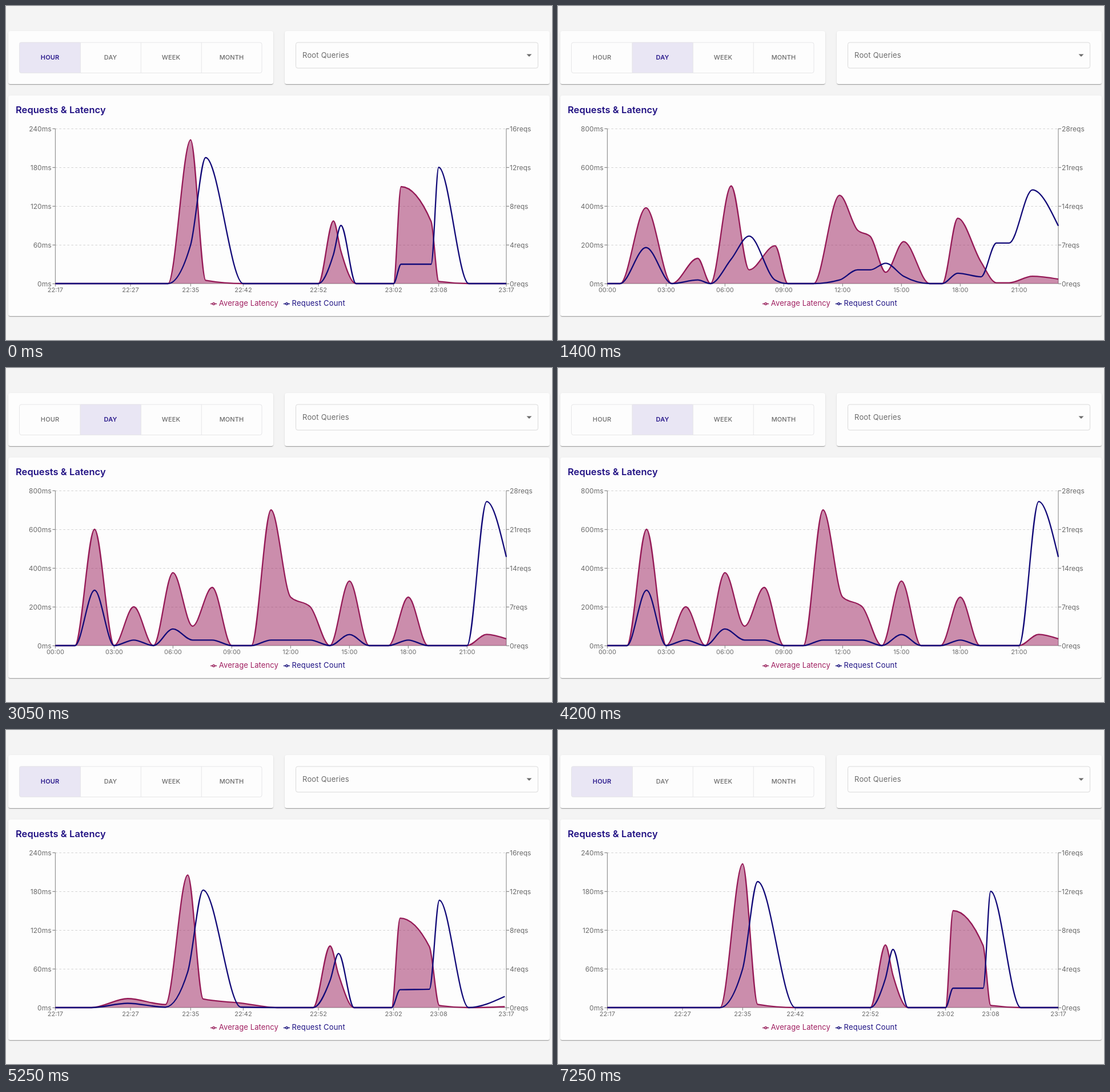
Recreate the animation shown at these times as an HTML page. Size 956x586 px, loop 7300 ms.

```html
<!DOCTYPE html>
<html lang="en">
<head>
<meta charset="utf-8">
<title>Requests &amp; Latency</title>
<style>
  html, body { margin: 0; width: 100%; height: 100%; overflow: hidden; background: #f4f4f4; }
  body { position: relative; font-family: Inter, "Open Sans", sans-serif; color: #6b6b6b; }
  .card {
    position: absolute; box-sizing: border-box; background: #fdfdfd; border-radius: 3.5px;
    box-shadow: 0 2px 1px -1px rgba(0,0,0,.2), 0 1px 1px rgba(0,0,0,.14), 0 1px 3px rgba(0,0,0,.1);
  }
  svg { position: absolute; left: 0; top: 0; }
  text { fill: #6b6b6b; }
  .btn { font-size: 11px; font-weight: 500; text-anchor: middle; letter-spacing: .1px; }
  .btn.on { font-weight: 600; fill: #2a1a8c; }
  .select { font-size: 13px; letter-spacing: .2px; }
  .title { font-size: 16.4px; font-weight: 600; fill: #1f0f82; letter-spacing: .1px; }
  .ylab { font-size: 12px; }
  .xlab { font-size: 11px; text-anchor: middle; }
  .key { font-size: 13px; }
  .end { text-anchor: end; }
  .frame { fill: none; stroke: #e6e6e8; }
  .axis { fill: none; stroke: #8c8c8c; stroke-width: 1.1; }
  .grid { fill: none; stroke: #d2d2d2; stroke-dasharray: 3.5 3.5; }
  .line { fill: none; stroke-width: 2.3; stroke-linejoin: round; }
  .pink { stroke: #951a57; }
  .blue { stroke: #120a78; }
</style>
</head>
<body>
<div class="card" style="left:4px;top:44px;width:464px;height:93px"></div>
<div class="card" style="left:488px;top:44px;width:464px;height:93px"></div>
<div class="card" style="left:4px;top:157px;width:948px;height:387px"></div>

<svg width="956" height="586" viewBox="0 0 956 586">
  <g id="buttons"></g>
  <rect x="507.5" y="64" width="424" height="45" rx="3.5" fill="none" stroke="#dadada"/>
  <text class="select" x="519" y="91">Root Queries</text>
  <path d="M911.5 84.5h9l-4.5 4.6z" fill="#6b6b6b"/>

  <text class="title" x="17" y="188">Requests &amp; Latency</text>
  <path class="grid" id="grid"/>
  <path class="axis" id="axis"/>
  <g id="labels"></g>
  <path id="fill" fill="#991f5d" fill-opacity=".5"/>
  <path id="latency" class="line pink"/>
  <path id="count" class="line blue"/>

  <g id="legend"></g>
</svg>

<script>
const LOOP = 7300, DURATION = 1500, FADE = 250;
const LEFT = 86.4, RIGHT = 876, TOP = 215, BASE = 487, ROW = 68;
const $ = id => document.getElementById(id);

// Sparse series: position -> value, all other positions are 0.
const fillIn = (at, values) => at.map(k => values[k] || 0);
const hours = Array.from({ length: 24 }, (_, i) => i);
const minutes = [0, 5, 10, 15, 18, 20, 25, 30, 35, 37, 38, 40, 45, 46, 50, 51, 55, 60];

const views = {
  hour: {
    at: minutes, span: 60, ms: 240, reqs: 16,
    ticks: { 0: '22:17', 10: '22:27', 18: '22:35', 25: '22:42', 35: '22:52', 45: '23:02', 51: '23:08', 60: '23:17' },
    latency: { 18: 222.5, 20: 5, 37: 97, 38: 50, 46: 150, 50: 96, 51: 3.5 },
    count: { 18: 4, 20: 13, 37: 3, 38: 6, 46: 2, 50: 2, 51: 12 }
  },
  day: {
    at: hours, span: 23, ms: 800, reqs: 28,
    ticks: { 0: '00:00', 3: '03:00', 6: '06:00', 9: '09:00', 12: '12:00', 15: '15:00', 18: '18:00', 21: '21:00' },
    latency: { 2: 600, 4: 200, 6: 376, 7: 100, 8: 300, 11: 700, 12: 250, 13: 200, 15: 333, 18: 250, 22: 58, 23: 35 },
    count: { 2: 10, 4: 1, 6: 3, 7: 1, 8: 1, 11: 1, 12: 1, 13: 1, 15: 2, 18: 1, 22: 26, 23: 16 }
  }
};

const xOf = (view, k) => LEFT + k / view.span * (RIGHT - LEFT);
const toPoints = (view, values, max) =>
  fillIn(view.at, values).map((v, i) => [xOf(view, view.at[i]), BASE - v / max * (BASE - TOP)]);

for (const v of Object.values(views)) {
  v.latencyPts = toPoints(v, v.latency, v.ms);
  v.countPts = toPoints(v, v.count, v.reqs);
}

// cubic-bezier(.25, .1, .25, 1)
function ease(t) {
  if (t <= 0) return 0;
  if (t >= 1) return 1;
  let lo = 0, hi = 1;
  for (let i = 0; i < 24; i++) {
    const s = (lo + hi) / 2, r = 1 - s;
    if (.75 * r * r * s + .75 * r * s * s + s * s * s < t) lo = s; else hi = s;
  }
  const r = 1 - lo;
  return .3 * r * r * lo + 3 * r * lo * lo + lo ** 3;
}

// Each new point starts at the old point with the same relative index.
function morph(from, to, f) {
  const ratio = from.length / to.length;
  return to.map(([x, y], i) => {
    const [px, py] = from[Math.floor(i * ratio)];
    return [px + (x - px) * f, py + (y - py) * f];
  });
}

// Monotone cubic curve through the points.
function curve(points) {
  const p = points.filter((q, i) => !i || q[0] - points[i - 1][0] > 1e-6);
  const n = p.length;
  const h = i => p[i + 1][0] - p[i][0];
  const s = i => (p[i + 1][1] - p[i][1]) / h(i);
  const m = p.map((_, i) => {
    if (!i || i === n - 1) return 0;
    const a = s(i - 1), b = s(i), avg = (a * h(i) + b * h(i - 1)) / (h(i - 1) + h(i));
    return (Math.sign(a) + Math.sign(b)) * Math.min(Math.abs(a), Math.abs(b), Math.abs(avg) / 2);
  });
  m[0] = (3 * s(0) - m[1]) / 2;
  m[n - 1] = (3 * s(n - 2) - m[n - 2]) / 2;
  let d = `M${p[0]}`;
  for (let i = 0; i < n - 1; i++) {
    const t = h(i) / 3, [x0, y0] = p[i], [x1, y1] = p[i + 1];
    d += `C${[x0 + t, y0 + t * m[i], x1 - t, y1 - t * m[i + 1], x1, y1].map(v => v.toFixed(2))}`;
  }
  return d;
}

const text = (cls, x, y, str) => `<text class="${cls}" x="${x}" y="${y}">${str}</text>`;
const names = ['HOUR', 'DAY', 'WEEK', 'MONTH'];
const buttonX = i => 24 + i * 106;

$('buttons').innerHTML =
  names.map((_, i) => `<rect class="bg" x="${buttonX(i) - .5}" y="63.5" width="107" height="54" rx="2" fill="#e9e6f4" opacity="0"/>`).join('') +
  '<rect class="frame" x="23.5" y="64" width="424.5" height="53.5" rx="3.5"/>' +
  `<path class="frame" d="${[1, 2, 3].map(i => `M${buttonX(i) + .3} 64v53.5`).join('')}"/>` +
  names.map((s, i) => text('btn', buttonX(i) + 53, 94, s)).join('');
const fills = document.querySelectorAll('.bg'), captions = document.querySelectorAll('.btn');

const rows = [0, 1, 2, 3, 4];
$('grid').setAttribute('d', rows.slice(0, 4).map(i => `M${LEFT} ${TOP + i * ROW + .5}H${RIGHT}`).join(''));

const legendItem = (x, cls, color, label, spacing) =>
  `<path class="${cls}" fill="none" stroke-width="1.4" d="M${x - 5.5} 522.5h3.7m3.6 0h3.7M${x - 1.8} 522.5a1.8 1.8 0 1 0 3.6 0a1.8 1.8 0 1 0-3.6 0"/>` +
  `<text class="key" x="${x + 9.2}" y="526.3" style="fill:${color};letter-spacing:${spacing}px">${label}</text>`;
$('legend').innerHTML =
  legendItem(363.6, 'pink', '#a01f60', 'Average Latency', .1) +
  legendItem(491.4, 'blue', '#1d1183', 'Request Count', .2);

function drawAxes(view) {
  const ticks = Object.entries(view.ticks);
  $('axis').setAttribute('d',
    `M${LEFT} ${TOP}V${BASE}H${RIGHT}V${TOP}` +
    rows.map(i => `M${LEFT - 5} ${TOP + i * ROW + .4}h5M${RIGHT} ${TOP + i * ROW + .4}h5`).join('') +
    ticks.map(([k]) => `M${xOf(view, k)} ${BASE}v5`).join(''));
  $('labels').innerHTML =
    rows.map(i => {
      const y = TOP + i * ROW + 4.8, part = (4 - i) / 4;
      return text('ylab end', 79.5, y, view.ms * part + 'ms') + text('ylab', 882, y, view.reqs * part + 'reqs');
    }).join('') +
    ticks.map(([k, s]) => text('xlab', xOf(view, k), 502, s)).join('');
}

let shown;
function show(name) {
  if (shown === name) return;
  shown = name;
  drawAxes(views[name]);
  captions.forEach((c, i) => c.classList.toggle('on', i === (name === 'hour' ? 0 : 1)));
}

// When the range is switched, and when the curves start to move.
const steps = [
  { view: 'day', from: 'hour', click: 800, start: 833 },
  { view: 'hour', from: 'day', click: 4225, start: 4257 }
];

function draw(t) {
  const step = t < steps[0].click ? null : t < steps[1].click ? steps[0] : steps[1];
  const name = step ? step.view : 'hour', view = views[name];
  show(name);

  const fade = step ? ease((t - step.click) / FADE) : 1;
  const on = name === 'hour' ? 0 : 1;
  fills[on].setAttribute('opacity', fade);
  fills[1 - on].setAttribute('opacity', 1 - fade);

  const f = step ? ease((t - step.start) / DURATION) : 1;
  const old = views[step ? step.from : 'hour'];
  const pick = key => f < 1 ? morph(old[key], view[key], f) : view[key];
  const lat = pick('latencyPts'), top = curve(lat);
  $('latency').setAttribute('d', top);
  $('fill').setAttribute('d', `${top}V${BASE}H${lat[0][0]}Z`);
  $('count').setAttribute('d', curve(pick('countPts')));
}

const began = performance.now();
function tick() {
  draw((performance.now() - began) % LOOP);
  requestAnimationFrame(tick);
}
tick();
</script>
</body>
</html>
```
